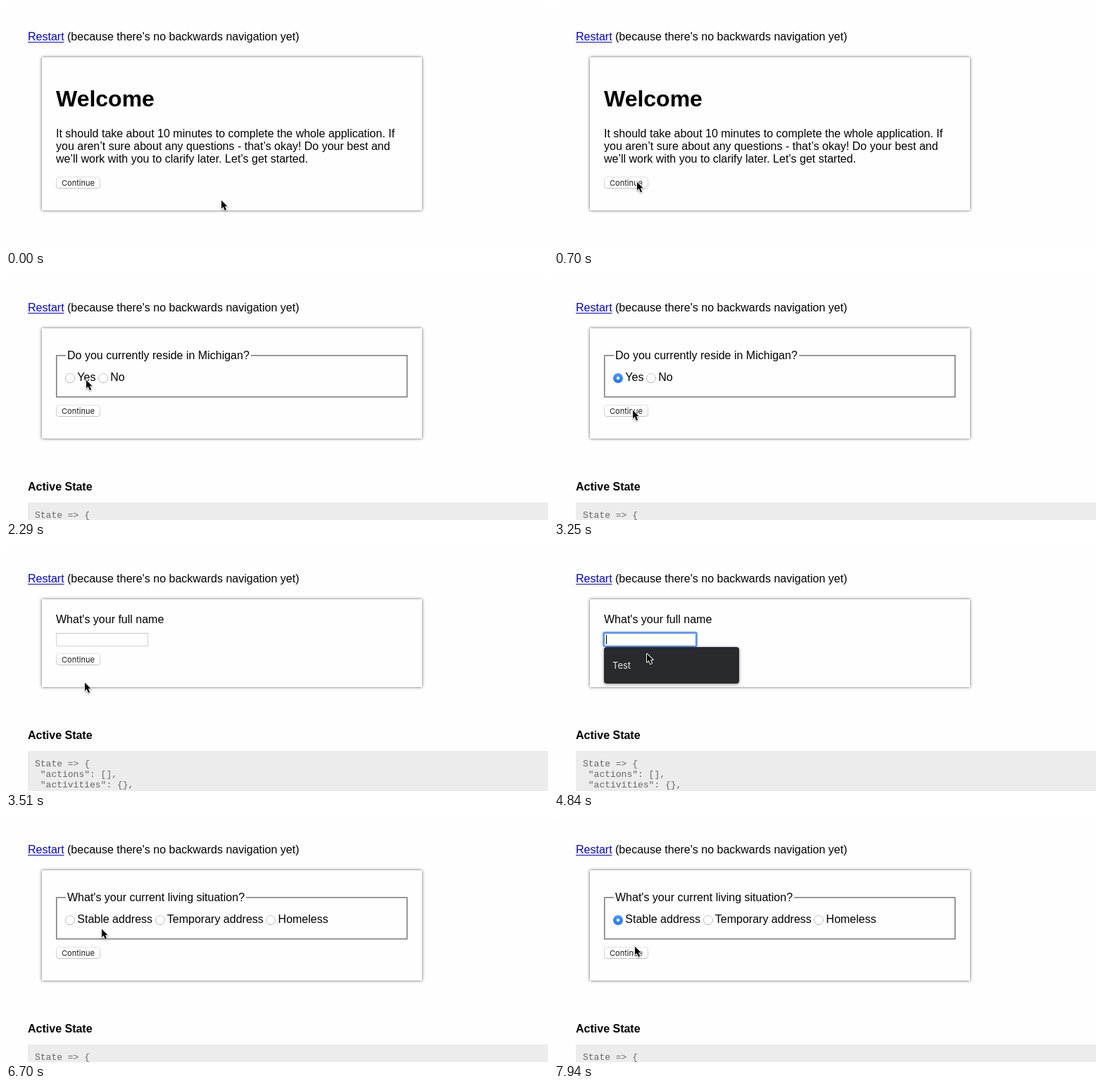
Write an HTML page with a canvas that moves like this. It is 770 px wide and 346 px high and loops after 8 s.

```html
<!DOCTYPE html>
<html lang="en">
<head>
<meta charset="utf-8">
<title>Application form</title>
<style>
html, body { margin: 0; width: 100%; height: 100%; overflow: hidden; background: #fefefe; }
canvas { display: block; width: 770px; height: 346px; }
</style>
</head>
<body>
<canvas id="stage" width="770" height="346"></canvas>
<script>
const ctx = document.getElementById('stage').getContext('2d');
const LOOP = 8000;
const PAGE = '#fefefe';
const SANS = '"Liberation Sans", Arial, sans-serif';
const MONO = '"Liberation Mono", "Courier New", monospace';
const UI = 'Inter, Roboto, sans-serif';

// Pointer moves: start and end time, number of steps, destination.
const START = [305, 275];
const MOVES = [
  [260, 700, 6, 117, 249],
  [1760, 2290, 7, 113, 145],
  [2720, 3340, 8, 111, 190],
  [4050, 4480, 6, 124, 130],
  [4840, 4840, 1, 131, 149],
  [4920, 5010, 2, 136, 165],
  [5370, 5620, 4, 121, 158],
  [6610, 7050, 6, 175, 145],
  [7500, 7940, 6, 114, 180]
];

const between = (t, a, b) => t >= a && t < b;

function text(str, x, y, font = '16px ' + SANS, color = '#000') {
  ctx.font = font;
  ctx.fillStyle = color;
  ctx.fillText(str, x, y);
  return ctx.measureText(str).width;
}

function rect(x, y, w, h, color) {
  ctx.fillStyle = color;
  ctx.fillRect(x, y, w, h);
}

function rounded(x, y, w, h, r, fill, stroke) {
  ctx.beginPath();
  ctx.roundRect(x, y, w, h, r);
  if (fill) { ctx.fillStyle = fill; ctx.fill(); }
  if (stroke) { ctx.strokeStyle = stroke; ctx.lineWidth = 1; ctx.stroke(); }
}

function shadowed(blur, dy, color, draw) {
  ctx.save();
  ctx.shadowBlur = blur;
  ctx.shadowOffsetY = dy;
  ctx.shadowColor = color;
  draw();
  ctx.restore();
}

function vertical(y0, y1, top, bottom) {
  const g = ctx.createLinearGradient(0, y0, 0, y1);
  g.addColorStop(0, top);
  g.addColorStop(1, bottom);
  return g;
}

function card(bottom) {
  shadowed(4, 0, 'rgba(0,0,0,.65)', () => rect(51, 73, 540, bottom - 73, PAGE));
}

function button(y, pressed) {
  if (pressed) {
    rounded(71, y, 63, 17, 3.5, vertical(y, y + 17, '#4c9bfb', '#0c5ce8'));
  } else {
    rounded(71.5, y + .5, 62, 16, 3.5, '#fff', vertical(y, y + 17, '#e2e2e2', '#c2c2c2'));
  }
  text('Continue', 79, y + 13, '11px ' + UI, '#1c1c1c');
}

function radio(x, y, on) {
  ctx.beginPath();
  ctx.arc(x, y, on ? 7 : 6.5, 0, 7);
  ctx.fillStyle = on ? vertical(y - 7, y + 7, '#4a98fb', '#1f74f5') : '#fff';
  ctx.fill();
  if (!on) {
    ctx.strokeStyle = vertical(y - 7, y + 7, '#c8c8c8', '#adadad');
    ctx.lineWidth = 1;
    ctx.stroke();
    return;
  }
  ctx.beginPath();
  ctx.arc(x, y, 2.2, 0, 7);
  ctx.fillStyle = '#fff';
  ctx.fill();
}

function fieldset(legend, options, chosen) {
  const dark = '#767676', light = '#bdbdbd';
  rect(71, 111, 500, 61, light);
  rect(71, 111, 499, 60, dark);
  rect(72, 112, 497, 58, light);
  rect(73, 113, 496, 57, PAGE);
  ctx.font = '16px ' + SANS;
  rect(85, 103, ctx.measureText(legend).width + 4, 18, PAGE);
  text(legend, 87, 117);
  let x = 91;
  options.forEach((label, i) => {
    radio(Math.round(x), 144, chosen && i === 0);
    x += 10.3;
    x += text(label, x, 148) + 10.5;
  });
}

function activeState(y) {
  text('Active State', 31, y, 'bold 16px ' + SANS);
  rect(31, y + 17, 739, 346, '#ececec');
  ['State => {', ' "actions": [],', ' "activities": {},'].forEach((line, i) =>
    text(line, 41, y + 39 + i * 15, '13px ' + MONO, '#666'));
}

function welcome(t) {
  card(291);
  text('Welcome', 71, 143, 'bold 32px ' + SANS);
  [
    'It should take about 10 minutes to complete the whole application. If',
    'you aren’t sure about any questions - that’s okay! Do your best and',
    'we’ll work with you to clarify later. Let’s get started.'
  ].forEach((line, i) => text(line, 71, 187 + i * 18));
  button(243, t >= 870);
}

function residence(t) {
  card(230);
  fieldset('Do you currently reside in Michigan?', ['Yes', 'No'], t >= 2460);
  button(182, t >= 3420);
  activeState(304);
}

function nameField(t) {
  const focused = between(t, 4570, 5710);
  const filled = t >= 4920;
  if (focused) rounded(69, 119, 135, 22, 3, '#6ba1f3');
  rect(71, 121, 131, 19, focused ? '#4f8bea' : filled ? '#b9bec8' : '#d2d2d2');
  rect(72, 122, 129, 17, filled ? '#e8f0fe' : '#fff');
  if (!focused) rect(71, 121, 131, 1, filled ? '#747881' : '#c4c4c4');
  const width = filled ? text('Test', 74, 135, '11px ' + UI, '#111') : 0;
  if (focused) rect(t < 5190 ? 74 : 75 + Math.round(width), 124, 1, 13, '#000');
}

function suggestions(hover) {
  shadowed(4, 1, 'rgba(0,0,0,.45)', () => rounded(71, 141, 192, 52, 4, '#292a2d'));
  if (hover) rect(71, 149, 192, 36, '#404144');
  text('Test', 83, 172, '13px ' + UI, '#e6e7ea');
}

function fullName(t) {
  card(198);
  text("What's your full name", 71, 107);
  button(150, t >= 5710);
  nameField(t);
  activeState(272);
  if (between(t, 4570, 5190)) suggestions(t >= 4920);
}

function living(t) {
  card(230);
  fieldset("What's your current living situation?",
    ['Stable address', 'Temporary address', 'Homeless'], t >= 7320);
  button(182, false);
  activeState(304);
}

function pointerAt(t) {
  let [x, y] = START;
  for (const [from, to, steps, tx, ty] of MOVES) {
    if (t < from) break;
    const gap = steps > 1 ? (to - from) / (steps - 1) : 1;
    const p = Math.min((Math.floor((t - from) / gap + .05) + 1) / steps, 1);
    const e = p * p * (3 - 2 * p);
    x += (tx - x) * e;
    y += (ty - y) * e;
  }
  return [x, y];
}

function arrow(x, y) {
  const shape = new Path2D('M1 1.8V13.6L3.7 11.1L5.9 16.2L8.1 15.2L5.9 10.3H9.6Z');
  ctx.save();
  ctx.translate(x, y);
  ctx.lineWidth = 2;
  ctx.lineJoin = 'round';
  ctx.strokeStyle = '#fff';
  shadowed(2, 1, 'rgba(0,0,0,.4)', () => ctx.stroke(shape));
  ctx.fillStyle = '#000';
  ctx.fill(shape);
  ctx.restore();
}

function beam(x, y) {
  ctx.strokeStyle = '#222';
  ctx.lineWidth = 1;
  ctx.stroke(new Path2D(`M${x - 2.5} ${y - 7.5}q2.5 0 3 2v11q-.5 2-3 2m6-15q-2.5 0-3 2m0 11q.5 2 3 2`));
}

function draw(t) {
  rect(0, 0, 770, 346, PAGE);
  const w = text('Restart', 31, 49, undefined, '#0000ee');
  rect(31, 51, w, 1, '#0000ee');
  text(" (because there's no backwards navigation yet)", 31 + w, 49);

  const page = t < 960 ? welcome : t < 3510 ? residence : t < 5800 ? fullName : living;
  page(t);

  const [x, y] = pointerAt(t);
  const overInput = page === fullName && between(y, 121, 140);
  (overInput ? beam : arrow)(Math.round(x), Math.round(y));
}

const begin = performance.now();
function tick() {
  draw((performance.now() - begin) % LOOP);
  requestAnimationFrame(tick);
}
tick();
</script>
</body>
</html>
```
